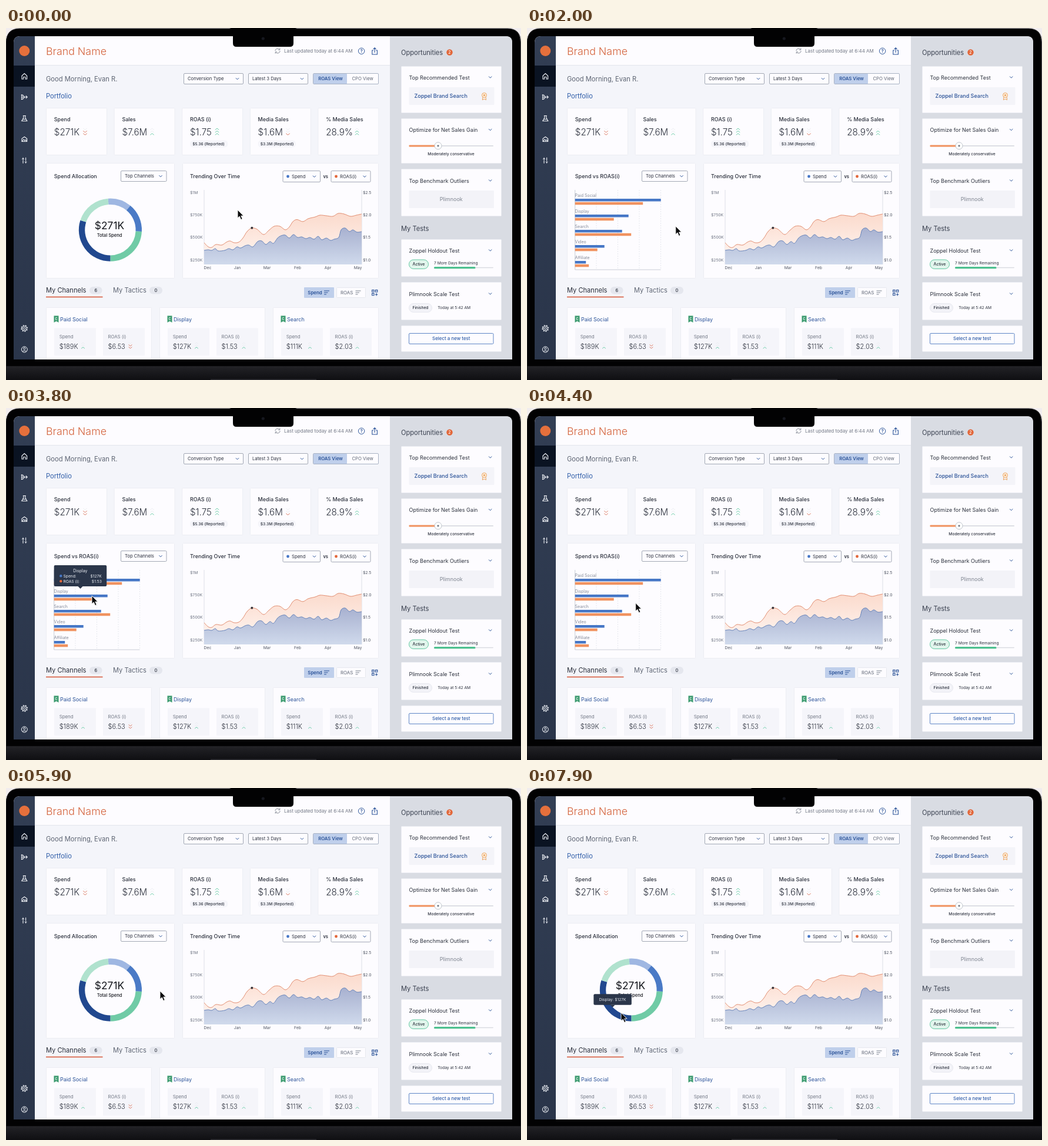
Write an HTML page that moves like this. It is 876x600 px and loops after 8000 ms.

```html
<!DOCTYPE html>
<html lang="en">
<head>
<meta charset="utf-8">
<title>Marketing dashboard</title>
<style>
html, body { margin: 0; width: 100%; height: 100%; overflow: hidden; background: #f1edee; }
svg { display: block; width: 876px; height: 600px; font-family: Inter, sans-serif; }
</style>
</head>
<body>
<svg id="stage" viewBox="0 0 876 600" xmlns="http://www.w3.org/2000/svg"></svg>
<script>
const INK = '#2b303c', GREY = '#717784', NAVY = '#2a5298', BLUE = '#4677c6', ORANGE = '#f0925f',
  RED = '#dc7a63', GREEN = '#6fceab', PALE = '#e6e8ee', CARD = '#fdfcff', TIP = '#2b364a';

// Drawing helpers
const text = (x, y, size, str, fill = INK, weight = 400, anchor = 'start') =>
  `<text x="${x}" y="${y}" font-size="${size}" fill="${fill}" font-weight="${weight}" text-anchor="${anchor}">${str}</text>`;
const mid = (x, y, size, str, fill, weight) => text(x, y, size, str, fill, weight, 'middle');
const box = (x, y, w, h, fill, stroke = 'none', r = 1) =>
  `<rect x="${x}" y="${y}" width="${w}" height="${h}" rx="${r}" fill="${fill}" stroke="${stroke}"/>`;
const dot = (x, y, r, fill, stroke = 'none') =>
  `<circle cx="${x}" cy="${y}" r="${r}" fill="${fill}" stroke="${stroke}"/>`;
const line = (d, stroke, w = 1, extra = '') =>
  `<path d="${d}" fill="none" stroke="${stroke}" stroke-width="${w}" ${extra}/>`;
const shape = (d, fill) => `<path d="${d}" fill="${fill}"/>`;
const group = (id, body) => `<g id="${id}">${body}</g>`;
const card = (x, y, w, h) => box(x, y, w, h, CARD, '#ecedf3');
const down = (x, y, color = '#4a5263') => line(`M${x - 2.6} ${y - 1.3}l2.6 2.6l2.6-2.6`, color);

function trend(x, y, dir, lit, s = 1) {
  const color = dir > 0 ? GREEN : RED;
  return [0, 1, 2].map(i => line(
    `M${x - 3.2 * s} ${y - i * 4.3 * s + dir * 1.3}l${3.2 * s} ${-dir * 2.6 * s}l${3.2 * s} ${dir * 2.6 * s}`,
    i < lit ? color : '#eceef2')).join('');
}

function select(x, y, w, h, label, color, fill = CARD) {
  const pad = color ? 15 : 6.5;
  return box(x, y, w, h, fill, '#a3a9b5', 1.5) +
    (color ? dot(x + 8.5, y + h / 2, 2.4, color) : '') +
    text(x + pad, y + h / 2 + 2.7, 7.7, label) + down(x + w - 10, y + h / 2, NAVY);
}

function smooth(p) {
  let d = `M${p[0]} ${p[1]}`;
  const at = i => { i = Math.max(0, Math.min(p.length / 2 - 1, i)); return [p[2 * i], p[2 * i + 1]]; };
  for (let i = 0; i < p.length / 2 - 1; i++) {
    const [a, b, c, e] = [at(i - 1), at(i), at(i + 1), at(i + 2)];
    d += `C${b[0] + (c[0] - a[0]) / 6} ${b[1] + (c[1] - a[1]) / 6} ` +
      `${c[0] - (e[0] - b[0]) / 6} ${c[1] - (e[1] - b[1]) / 6} ${c[0]} ${c[1]}`;
  }
  return d;
}

function arc(from, to, color) {
  const pt = a => {
    const r = a * Math.PI / 180;
    return `${177.4 + 48.4 * Math.sin(r)} ${344.2 - 48.4 * Math.cos(r)}`;
  };
  return line(`M${pt(from)}A48.4 48.4 0 0 1 ${pt(to)}`, color, 10.4);
}

const fade = (id, a, b) =>
  `<linearGradient id="${id}" x2="0" y2="1"><stop stop-color="${a}"/><stop offset="1" stop-color="${b}"/></linearGradient>`;

// Laptop and page background
function laptop() {
  return `<defs>${fade('base', '#222226', '#0f0f12')}${fade('side', '#323e54', '#2a354a')}` +
    `${fade('warm', '#fbdacc', '#fff8f5')}${fade('cool', '#a8b1d0', '#d0daec')}` +
    `<clipPath id="screen"><path d="M13 565V25Q13 14 24 14H850Q861 14 861 25V565Z"/></clipPath></defs>` +
    shape('M0 600V24Q1 1 23 1H853Q875 1 875 24L876 600Z', '#020203') +
    line('M.5 577V24Q1 1 23 1H853Q875.5 1 875.5 24V577', '#242427', .8) +
    box(0, 577, 876, 23, 'url(#base)', 'none', 0) + line('M0 577H876', '#29292d') +
    box(348, 598.5, 180, 1.5, '#2c2c31', 'none', 0);
}
const notch = () => shape('M380 0H495Q489 1 489 8V26Q489 32 483 32H392Q386 32 386 26V8Q386 1 380 0Z', '#020203') +
  dot(437.3, 18, 2.6, '#15171f');

function sidebar() {
  const icons =
    'M27 81.5L31.3 77.5L35.6 81.5V87H33V83.5H29.6V87H27Z' +
    'M27 114.5h2l2.4 3.3h4.6M27 117.8h5M27 121h2l2.4-3.2M33.8 115.4l2.4 2.4l-2.4 2.4' +
    'M28.8 149.5h5M29.8 149.5v3.5l-3 5.5h9l-3-5.5v-3.5M28.5 155.5h5.6' +
    'M27 193.5v-5l4.3-3l4.3 3v5ZM27.5 193l2.5-3l2 2l1.5-1.5l2 2.5' +
    'M29 220.8v2.4M29 225v5.8M27.2 223.4h3.6M33.6 220.8v5.8M33.6 228.4v2.4M31.8 228.2h3.6';
  return box(13, 14, 36, 552, 'url(#side)', 'none', 0) + box(13, 64, 36, 36, '#0a1322', 'none', 0) +
    dot(31.3, 39, 9, '#e5703c') + line(icons, '#f3f5fa', 1.1) +
    [114.5, 117.8, 121].map(y => dot(26.9, y, 1.2, '#f3f5fa')).join('') +
    dot(31.3, 512, 1.8, 'none', '#f3f5fa') + dot(31.3, 512, 4, 'none', '#f3f5fa') +
    line('M31.3 512m-5.2 0a5.2 5.2 0 1 0 10.4 0a5.2 5.2 0 1 0-10.4 0', '#f3f5fa', 1.4, 'stroke-dasharray="2 2.08"') +
    dot(31.3, 548, 5, 'none', '#f3f5fa') + dot(31.3, 546.4, 1.7, 'none', '#f3f5fa') +
    line('M28 551.5q3.3-3 6.6 0', '#f3f5fa', 1.1);
}

function header() {
  return box(49, 14, 604, 49, CARD, 'none', 0) + line('M49 63.5H653', '#e3e5ec') +
    text(68, 46, 17.8, 'Brand Name', '#d4623b', 300) +
    line('M457.8 39a4.2 4.2 0 0 1 7.6-2.2M466.2 39a4.2 4.2 0 0 1-7.6 2.2M465.8 34.4v2.8h-2.8M458.2 43.6v-2.8h2.8', '#8b909b') +
    text(473, 42, 8, 'Last updated today at 6:44 AM', GREY) +
    dot(604.6, 39.3, 5.2, 'none', NAVY) + mid(604.6, 42.3, 8, '?', NAVY, 600) +
    line('M625 38h-2.2v7h8.6v-7h-2.2M627.1 42v-8M624.8 36l2.3-2.3l2.3 2.3', NAVY, 1.1) +
    text(68, 90.5, 11.2, 'Good Morning, Evan R.', '#5f6674') +
    text(68, 119.5, 11.1, 'Portfolio', '#2f5da8') +
    select(302.5, 77.5, 101, 18, 'Conversion Type') + select(412.5, 77.5, 101, 18, 'Latest 3 Days') +
    box(522.5, 77.5, 111, 18, CARD, '#a9b3c4', 1.5) + box(523, 78, 57, 17, '#bfcfeb') +
    mid(552, 89.2, 7.7, 'ROAS View', NAVY, 600) + mid(606.7, 89.2, 7.7, 'CPO View', '#5f6674');
}

function metrics() {
  const rows = [
    ['Spend', '$271K', 134.5, -1, 2], ['Sales', '$7.6M', 248.5, 1, 1],
    ['ROAS (i)', '$1.75', 359, 1, 3, '$5.36 (Reported)'],
    ['Media Sales', '$1.6M', 479.5, -1, 1, '$3.3M (Reported)'], ['% Media Sales', '28.9%', 597, 1, 2]];
  return rows.map(([name, value, tx, dir, lit, note], i) => {
    const x = 68.5 + i * 115.6;
    return card(x, 136.5, 103, 80) + text(x + 13.3, 159.3, 9, name, INK, 500) +
      text(x + 13.3, 183, 15.2, value, INK, 300) + trend(tx, 181, dir, lit) +
      (note ? box(x + 13.5, 191.5, 64, 12, '#f5f5fa', 'none', 5) + text(x + 17.5, 200, 6.7, note, INK, 500) : '');
  }).join('');
}

function trending() {
  const hot = smooth([337, 366, 344, 373, 350, 374, 357, 369, 367, 370, 375, 365, 381, 363, 388, 366, 396, 365, 403, 358,
    410, 347, 418, 341, 427, 343, 438, 352, 447, 345, 456, 338, 466, 338, 475, 344, 482, 339, 488, 330, 495, 326.5, 505, 330,
    514, 325, 526, 322, 534, 319, 545, 320, 556, 321, 565, 316, 575, 317, 586, 321, 596, 319, 605, 317]);
  const cold = smooth([337, 379, 344, 378, 350, 379, 356, 376, 361, 380, 372, 379, 379, 376, 386, 378, 393, 373, 399, 375,
    407, 371, 413, 370, 420, 373, 428, 364, 435, 363, 442, 369, 449, 364, 455, 367, 462, 358, 468, 354, 475, 353, 482, 358,
    489, 352, 496, 357, 503, 356, 510, 359, 517, 357, 524, 360, 531, 355, 537, 361, 545, 358, 552, 362, 558, 360, 566, 357,
    570, 344, 577, 341, 584, 347, 590, 344, 597, 348, 605, 347]);
  const left = ['$1M', '$750K', '$500K', '$250K'], right = ['$2.5', '$2.0', '$1.5', '$1.0'];
  const months = { Dec: 343, Jan: 393.5, Mar: 444, Feb: 496, Apr: 547.5, May: 598.5 };
  return card(300.5, 230.5, 333, 196) + text(313, 255.5, 9, 'Trending Over Time', INK, 500) +
    select(471, 243.5, 63.5, 19, 'Spend', BLUE) + mid(543.7, 255.8, 7.5, 'vs', INK, 600) +
    select(553, 243.5, 67, 19, 'ROAS(i)', '#e2673a') +
    line('M337 276V403M605 276V403', '#dcdee6') +
    shape(hot + 'V403H337Z', 'url(#warm)') + line(hot, '#e28d70') +
    shape(cold + 'V403H337Z', 'url(#cool)') + line(cold, '#6583ba') + dot(418.3, 340.7, 2, '#3a3338') +
    left.map((s, i) => text(313, 283 + i * 38.2, 6.8, s, '#6d7380')).join('') +
    right.map((s, i) => text(607, 283 + i * 38.2, 6.8, s, '#4d5360')).join('') +
    Object.entries(months).map(([s, x]) => mid(x, 411, 6.8, s, '#4d5360')).join('');
}

const sorter = (x, color) => line(`M${x} 448H${x + 9}M${x} 451H${x + 6.5}M${x} 454H${x + 4}`, color, 1.2);

function channels() {
  const rows = [['Paid Social', '$189K', '$6.53', -1, 2], ['Display', '$127K', '$1.53', 1, 1], ['Search', '$111K', '$2.03', 1, 1]];
  return text(68, 450.5, 11.1, 'My Channels', INK) + box(142, 441, 21.5, 12.5, '#e5e7ee', 'none', 6) +
    mid(152.8, 449.8, 7.4, '6', INK, 500) + box(68, 457.6, 96.5, 1.8, '#d9694f', 'none', 0) +
    text(182, 450.5, 11.1, 'My Tactics', '#5f6674') + box(244, 441, 22, 12.5, '#e5e7ee', 'none', 6) +
    mid(255, 449.8, 7.4, '0', INK, 500) +
    box(507, 442, 51, 18, '#bfcfeb') + text(513.3, 454, 7.9, 'Spend', NAVY, 600) + sorter(541, NAVY) +
    box(562.5, 442.5, 49, 17, CARD, PALE) + text(569, 454, 7.9, 'ROAS', '#5f6674') + sorter(594.5, '#7b818e') +
    line('M622.6 446.6h3.4v3.4h-3.4ZM628.4 446.6h3.4v3.4h-3.4ZM622.6 452.4h3.4v3.4h-3.4ZM630.1 452v4.4M627.9 454.2h4.4', NAVY, 1.1) +
    rows.map(([name, spend, roas, dir, lit], i) => {
      const x = 68.5 + i * 193;
      return card(x, 476.5, 179, 100) + shape(`M${x + 13} 490.5h8v11.5l-4-2.2l-4 2.2Z`, '#3d9b70') +
        mid(x + 17, 498, 5.5, 'C', '#fff', 600) + text(x + 23.4, 499.5, 9, name, NAVY) +
        box(x + 13.5, 511.5, 71, 47, '#f5f5fa') + box(x + 96.5, 511.5, 71, 47, '#f5f5fa') +
        text(x + 22.3, 529, 7.8, 'Spend', GREY) + text(x + 22.3, 546.5, 11, spend, INK, 300) +
        trend(x + 62.5, 545, 1, 1, .9) + text(x + 105, 529, 7.8, 'ROAS (i)', GREY) +
        text(x + 105, 546.5, 11, roas, INK, 300) + trend(x + 143, 545, dir, lit, .9);
    }).join('');
}

function opportunities() {
  const cards = [[65, 80], [154, 77], [240, 81], [360, 64], [433, 65], [507, 45]];
  const titles = [['Top Recommended Test', 87.5], ['Optimize for Net Sales Gain', 177], ['Top Benchmark Outliers', 263.5],
    ['Zoppel Holdout Test', 382.5], ['Plimnook Scale Test', 456.5]];
  return box(653, 14, 209, 552, '#d9dce3', 'none', 0) +
    text(672, 45.5, 11.1, 'Opportunities', '#3a4150') + dot(754.5, 41.5, 5.2, '#e2673a') + mid(754.5, 44, 7, '2', '#fff', 500) +
    text(672, 346, 11.1, 'My Tests', '#3a4150') +
    cards.map(([y, h]) => card(672.5, y + .5, 170, h - 1)).join('') +
    titles.map(([s, y]) => text(685.5, y, 9, s) + down(823.7, y - 3.7, NAVY)).join('') +
    box(685.5, 101, 145, 30, '#f4f4f9') + text(694.5, 119.3, 9, 'Zoppel Brand Search', NAVY, 500) +
    line('M811 117.5l-.6 5l3.1-1.4l3.1 1.4l-.6-5', '#eda55f') + dot(813.5, 114.5, 4, '#fdeedd', '#eda55f') +
    dot(813.5, 114.5, 1.6, '#eda55f') +
    box(735, 200, 94, 1.8, '#d9dbe1') + box(685.5, 199.5, 50, 3, ORANGE) +
    dot(735, 200.8, 6, '#fff', '#bfc4cc') + dot(735, 200.8, 1.6, '#6c7480') +
    mid(757, 216.8, 6.7, 'Moderately conservative', INK, 500) +
    box(685.5, 277, 144.5, 30, '#f3f3f8') + mid(757.3, 295.3, 9, 'Plimnook', '#7f8591') +
    box(685.5, 395, 33, 15.5, '#e1f5ec', '#62c8a1', 7.7) + mid(702, 405.4, 6.9, 'Active', INK, 500) +
    text(728, 402.5, 6.7, '7 More Days Remaining') +
    box(728, 407.8, 101, 1.5, '#d9dbe1') + box(728, 407, 70.5, 3.2, '#4dc08e', 'none', 1.5) +
    box(685.5, 469.5, 39, 15, '#f3f3f8', '#e8e9f0', 7.5) + mid(705, 479.4, 6.7, 'Finished', INK, 500) +
    text(734.3, 479.4, 6.7, 'Today at 5:42 AM') +
    box(685.5, 520.5, 143.5, 18, CARD, '#5f86c6', 1.5) + mid(757.3, 532.4, 7.9, 'Select a new test', '#2f5da8', 500);
}

// Allocation card: two views and their tooltips
const donut = () => text(81.8, 255.5, 9, 'Spend Allocation', INK, 500) +
  arc(-4, 39.5, '#9fb7e2') + arc(39.5, 93, '#4a7ac6') + arc(93, 180, '#70cba6') +
  arc(180, 288, '#21488f') + arc(288, 356, '#b0e2ce') +
  mid(176, 342.7, 17.4, '$271K', '#14161c') + mid(176, 356.3, 7.5, 'Total Spend', '#14161c', 500);

function bars() {
  const rows = [['Paid Social', 146, 115.5], ['Display', 91, 66], ['Search', 80, 95.5], ['Video', 50, 38], ['Affiliate', 18.5, 23.5]];
  return text(81.8, 255.5, 9, 'Spend vs ROAS(i)', INK, 500) +
    line('M118 276V412M154.5 276V412M191 276V412M227.5 276V412', PALE, 1, 'stroke-dasharray="2 2"') +
    line('M81.7 276V412H227.5', '#c9cdd6') +
    rows.map(([name, a, b], i) => {
      const y = Math.round(291.2 + i * 26.4);
      return text(81.6, y - 3, 7, name, '#858b98') +
        box(81.7, y, a, 4.5, BLUE, 'none', 0) + box(81.7, y + 5.8, b, 4.5, ORANGE, 'none', 0);
    }).join('');
}

const rowTip = (y, name, spend, roas) => {
  const item = (dy, color, label, value) => dot(93.3, y + dy - 2.3, 2.2, color) +
    text(97.5, y + dy, 6.7, label, '#eef1f6') + text(162.8, y + dy, 6.7, value, '#eef1f6', 400, 'end');
  return box(81.7, y, 89.5, 36, TIP, 'none', 2) + shape(`M122.5 ${y + 36}h8l-4 4Z`, TIP) +
    mid(126.4, y + 11.6, 7, name, '#eef1f6') +
    item(20.6, BLUE, 'Spend:', spend) + item(29.6, '#e2673a', 'ROAS (i):', roas);
};
const ringTip = (x, y, w, str) => box(x - w / 2, y, w, 18.5, TIP, 'none', 2) +
  shape(`M${x - 4} ${y + 18.5}h8l-4 4Z`, TIP) + mid(x, y + 11.5, 6.6, str, '#e6eaf1');

const ARROW = 'M0 0V14L3.3 11L5.6 16.6L8.2 15.5L5.8 10.2H10Z';
const HAND = 'M-1.6 1.6Q0-1 1.6 1.6V6.4Q3.2 5.2 4.4 6.6Q6 5.6 7 7.2Q8.8 6.8 8.9 8.6V12Q8.6 14 7.4 15.4V17.4H-.6V15.8L-4.6 10.4Q-5.4 8-3.2 8.3L-1.6 10Z';

document.getElementById('stage').innerHTML = laptop() + `<g clip-path="url(#screen)">` +
  box(13, 14, 848, 552, '#f4f5fa', 'none', 0) + header() + metrics() + card(68.5, 230.5, 218, 196) +
  group('donut', donut()) + group('bars', bars()) + select(195.5, 243.5, 77.5, 18, 'Top Channels') +
  trending() + channels() + opportunities() + sidebar() +
  group('next', line('M259.5 334.5L269.5 343.5L259.5 352.5', '#8d929c', 1.3)) +
  group('paid', rowTip(241.5, 'Paid Social', '$189K', '$2.56')) + group('display', rowTip(268, 'Display', '$127K', '$1.53')) +
  group('videoTip', ringTip(216, 301.7, 57, 'Video: $48K')) +
  group('searchTip', ringTip(210.8, 351.3, 64.5, 'Search: $111K')) +
  group('displayTip', ringTip(145.6, 351.3, 64.5, 'Display: $127K')) +
  group('cursor', `<path id="arrow" d="${ARROW}" fill="#0b0b0d" stroke="#fff" stroke-width=".9"/>` +
    `<g id="hand"><path d="${HAND}" fill="#fff" stroke="#15161a" stroke-width="1.1"/>` +
    line('M1.6 6.4V10M4.4 6.8V10M7 7.4V10M1 12.5V15M3.4 12.5V15M5.8 12.5V15', '#15161a', .7) + '</g>') +
  '</g>' + notch();

// Timeline
const LOOP = 8000, STEP = 100;
const path = [[0, 394, 310], [1000, 262, 345], [1800, 262, 345], [2600, 203, 299], [3100, 203, 299], [3800, 146, 320],
  [4000, 146, 320], [5000, 256, 355], [5200, 262, 346], [5900, 262, 346], [6800, 229, 342], [7100, 229, 342],
  [7500, 206, 379], [7900, 160, 383], [LOOP, 160, 383]];
const shown = {
  donut: [[0, 1700], [5700, LOOP]], bars: [[1700, 5700]],
  next: [[900, 1800], [5200, 5900]], hand: [[900, 1800], [5200, 5900]],
  arrow: [[0, 900], [1800, 5200], [5900, LOOP]],
  paid: [[2400, 3500]], display: [[3500, 4200]],
  videoTip: [[6600, 7200]], searchTip: [[7200, 7700]], displayTip: [[7700, LOOP]]
};
const part = id => document.getElementById(id);
const ease = k => k * k * (3 - 2 * k);

function draw() {
  const t = Math.floor(performance.now() % LOOP / STEP) * STEP;
  for (const id in shown)
    part(id).style.display = shown[id].some(([a, b]) => t >= a && t < b) ? '' : 'none';
  const i = path.findIndex(p => p[0] > t);
  const [t0, x0, y0] = path[i - 1], [t1, x1, y1] = path[i];
  const k = ease((t - t0) / (t1 - t0));
  part('cursor').setAttribute('transform', `translate(${x0 + (x1 - x0) * k} ${y0 + (y1 - y0) * k})`);
  requestAnimationFrame(draw);
}
draw();
</script>
</body>
</html>
```
